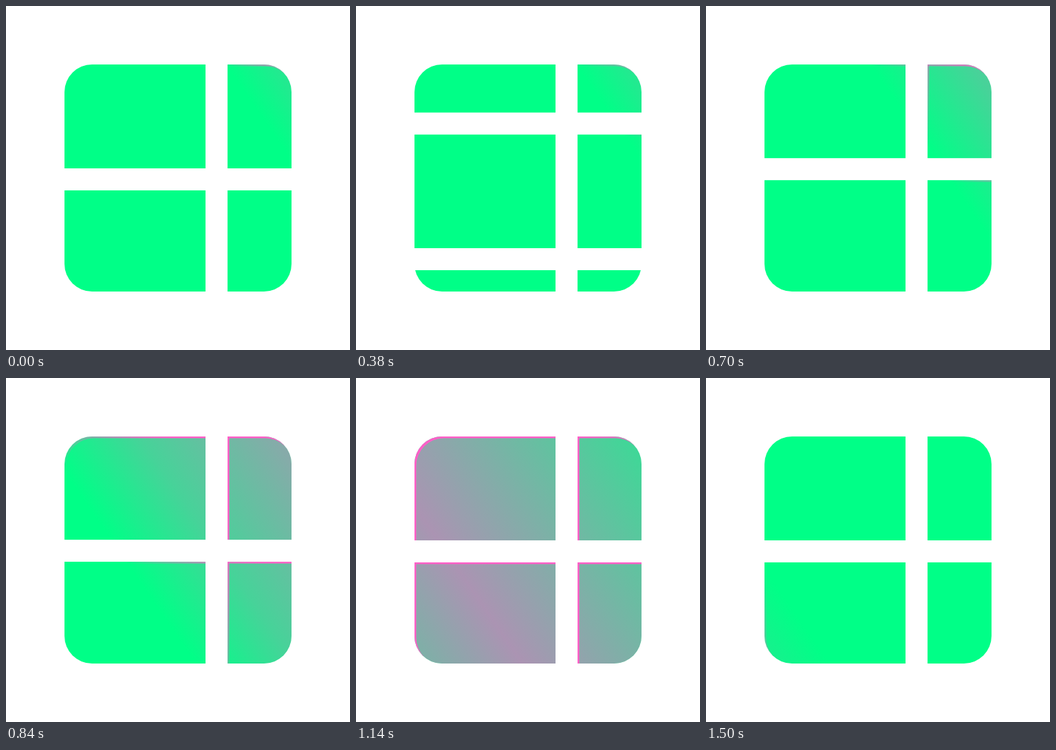
Animation, 500 px wide and 500 px high, one loop 2.08 s. Source, as an HTML page with a canvas:

```html
<!DOCTYPE html>
<html lang="en">
<head>
<meta charset="utf-8">
<title>Grid icon</title>
<style>
  html, body { margin: 0; width: 100%; height: 100%; overflow: hidden; background: #fff; }
  canvas { display: block; width: 500px; height: 500px; }
</style>
</head>
<body>
<canvas id="stage" width="500" height="500"></canvas>
<script>
const ctx = document.getElementById('stage').getContext('2d');
const LOOP = 2080, END = 1500, STEP = 20;
const GREEN = '#00ff87', PINK = '255,95,200';
const LEFT = 85, SIZE = 330, RADIUS = 40, BAR = 32, BAR_X = 290, REST_Y = 236, EDGE = 2.5;
const DIR = [0.825, -0.566];

// Offset from the wave centre and opacity there
const TINT = [[-375, 0], [-255, 0.28], [0, 0.67], [500, 0]];
const RIM = [[-375, 0], [-255, 0.8], [-215, 1], [250, 1], [500, 0]];

const clamp = v => Math.min(1, Math.max(0, v));

// cubic-bezier(.8, 0, .2, 1)
function ease(x) {
  if (x <= 0 || x >= 1) return clamp(x);
  let lo = 0, hi = 1, s = 0.5;
  for (let i = 0; i < 24; i++) {
    s = (lo + hi) / 2;
    const bx = 2.4 * s * (1 - s) ** 2 + 0.6 * s * s * (1 - s) + s ** 3;
    if (bx < x) lo = s; else hi = s;
  }
  return s * s * (3 - 2 * s);
}

// One bar leaves, one passes through, one comes to rest
function barTops(t) {
  const e = ease(t / 895);
  return [
    REST_Y + 116 * (t / 380) ** 3.24,
    53 + 442 * e,
    REST_Y - 436 * (1 - e)
  ];
}

function waveCentre(t) {
  return 525 - 1175 * clamp((t - 620) / 880) ** 1.2;
}

function waveFill(centre, stops) {
  const first = stops[0][0], span = stops[stops.length - 1][0] - first;
  const at = s => DIR.map(d => 250 + d * s);
  const g = ctx.createLinearGradient(...at(centre + first), ...at(centre + first + span));
  for (const [pos, alpha] of stops) {
    g.addColorStop((pos - first) / span, `rgba(${PINK},${alpha})`);
  }
  return g;
}

function draw(t) {
  const tops = barTops(t), centre = waveCentre(t);
  ctx.fillStyle = '#fff';
  ctx.fillRect(0, 0, 500, 500);

  ctx.save();
  ctx.beginPath();
  ctx.roundRect(LEFT, LEFT, SIZE, SIZE, RADIUS);
  ctx.clip();
  ctx.fillStyle = GREEN;
  ctx.fillRect(LEFT, LEFT, SIZE, SIZE);
  ctx.fillStyle = waveFill(centre, TINT);
  ctx.fillRect(LEFT, LEFT, SIZE, SIZE);

  // Lit top and left rims
  ctx.fillStyle = waveFill(centre, RIM);
  ctx.beginPath();
  ctx.rect(0, 0, 500, 500);
  ctx.roundRect(LEFT + EDGE, LEFT + EDGE, SIZE, SIZE, RADIUS);
  ctx.fill('evenodd');
  ctx.fillRect(BAR_X + BAR, LEFT, EDGE, SIZE);
  for (const y of tops) ctx.fillRect(LEFT, y + BAR, SIZE, EDGE);
  ctx.restore();

  ctx.fillStyle = '#fff';
  ctx.fillRect(BAR_X, 80, BAR, 340);
  for (const y of tops) ctx.fillRect(80, y, 340, BAR);
}

function tick() {
  const t = performance.now() % LOOP;
  draw(Math.min(END, Math.floor(t / STEP) * STEP));
  requestAnimationFrame(tick);
}
tick();
</script>
</body>
</html>
```
